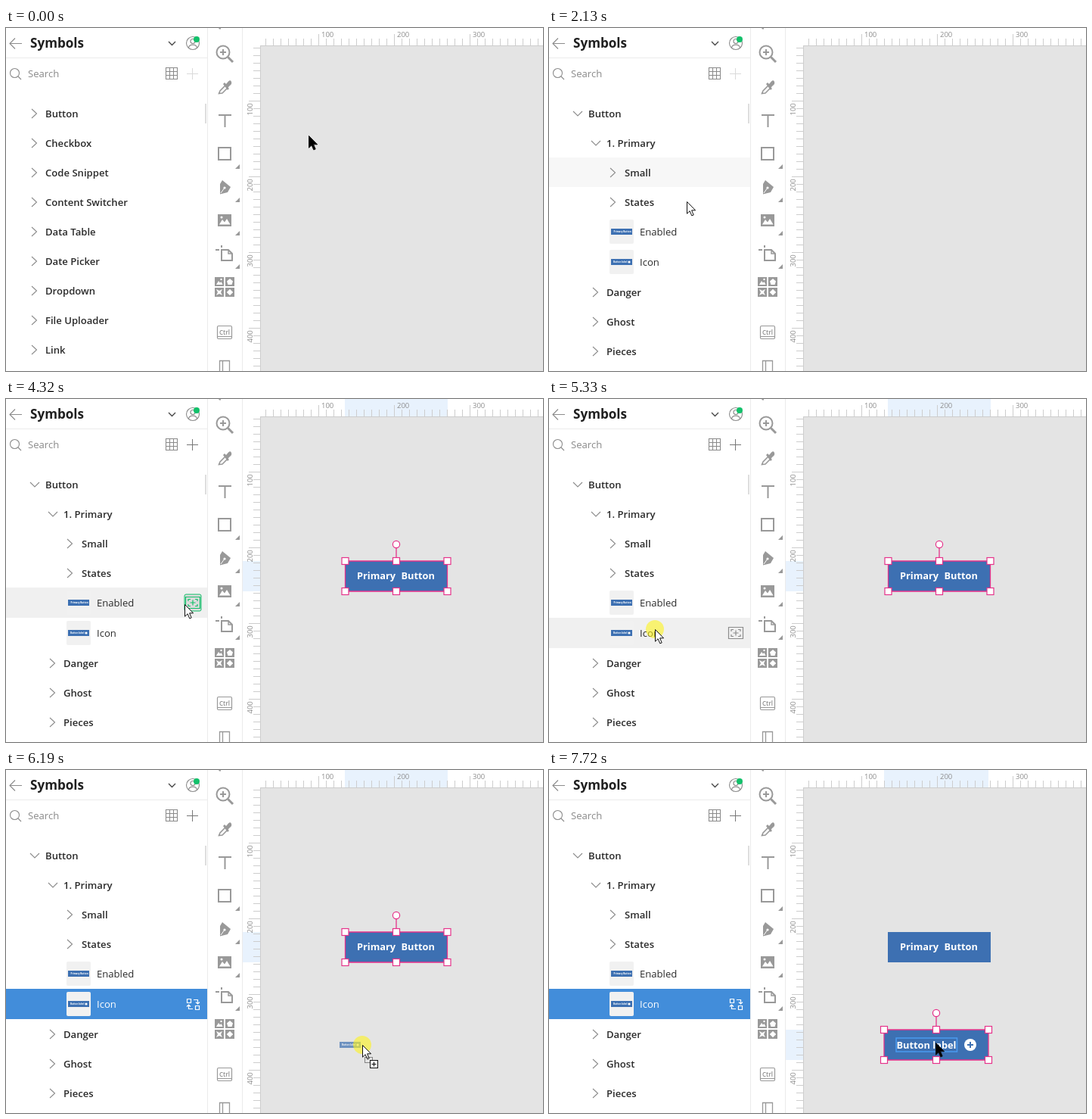
An HTML page for the animation above (8 s loop, 710 by 453 pixels).

```html
<!DOCTYPE html>
<html lang="en">
<head>
<meta charset="utf-8">
<title>Symbols panel</title>
<style>
  html, body { margin: 0; width: 100%; height: 100%; overflow: hidden; background: #fff; }
  svg { display: block; font-family: "Open Sans", "Noto Sans", sans-serif; }
  .line { fill: none; stroke: #8c8c8c; stroke-width: 1.1; }
  .tool { fill: none; stroke: #999; stroke-width: 2; }
  .solid { fill: #999; }
  .row { font-size: 13.1px; font-weight: 600; fill: #2b2b2b; }
  .item { font-size: 13.1px; fill: #2b2b2b; }
  .tick { fill: none; stroke: #cdcdcd; }
  .num { font-size: 9.5px; fill: #8c8c8c; }
  .label { font-size: 12.8px; font-weight: 700; fill: #fff; }
  .tiny { font-size: 3px; font-weight: 700; fill: #fff; }
  .pink { fill: none; stroke: #e5328a; stroke-width: 1.3; }
  .grip { fill: #fff; stroke: #e5328a; stroke-width: 1.2; }
  .blue { fill: #3d70b2; }
</style>
</head>
<body>
<svg id="stage" width="710" height="453" viewBox="0 0 710 453">
  <defs>
    <path id="arrow" d="M.5.5V16.2L4.1 12.7 6.8 18.9 9.2 17.9 6.6 11.8H11.6Z"/>
    <path id="corner" d="M6 0V6H0Z" class="solid"/>
    <g id="thumbA">
      <rect class="blue" width="28" height="8"/>
      <text class="tiny" x="3.5" y="5.2">Primary Button</text>
    </g>
    <g id="thumbB">
      <rect class="blue" width="28" height="8"/>
      <text class="tiny" x="3" y="5.2">Button label</text>
      <circle cx="24" cy="4" r="1.6" fill="#fff"/>
    </g>
  </defs>

  <!-- canvas and rulers -->
  <rect x="336" y="23" width="374" height="430" fill="#e4e4e4"/>
  <rect id="spanX" y="0" height="23" fill="#e8f2fd"/>
  <rect id="spanY" x="313" width="23" fill="#e8f2fd"/>
  <g id="rulers"></g>

  <!-- panel -->
  <rect id="hover" width="266"/>
  <path d="M0 39.5H266M266.5 0V453M312.5 0V453" fill="none" stroke="#ebebeb"/>
  <rect x="263" y="100" width="2" height="26" fill="#dedede"/>
  <path class="line" d="M21 20.5H5M12 13.5L5 20.5 12 27.5"/>
  <text x="32" y="26" font-size="17.1" font-weight="700" fill="#1f1f1f">Symbols</text>
  <path d="M215 18L219.5 22.5 224 18" fill="none" stroke="#444" stroke-width="1.3"/>
  <g class="line">
    <circle cx="247" cy="20" r="8.5"/>
    <circle cx="247" cy="17.5" r="3"/>
    <path d="M241.5 26C242.5 20.8 251.5 20.8 252.5 26"/>
    <circle cx="11.5" cy="59.5" r="6"/>
    <path d="M16 64L20 68M211.5 52.5H226.5V67.5H211.5ZM211.5 57.5H226.5M211.5 62.5H226.5M216.5 52.5V67.5M221.5 52.5V67.5"/>
  </g>
  <circle cx="252" cy="15" r="4" fill="#12c06a"/>
  <text class="item" x="29" y="65" style="fill:#8a8a8a">Search</text>
  <path id="add" d="M239 60.5H254M246.5 53V68" fill="none"/>
  <g id="closed"></g>
  <g id="open"></g>

  <!-- toolbar -->
  <path class="solid" d="M281 0H284V1.500H282Z"/>
  <g class="tool">
    <circle cx="287" cy="32" r="8.5"/>
    <path d="M283 32H291M287 28V36"/>
    <path d="M293.500 38.500L300 45" stroke-width="3"/>
    <path d="M281.500 86.500L283 83 290 76 293 79 286 86Z" stroke-width="1.600"/>
    <path d="M281 115H298M289.500 115V131"/>
    <rect x="281" y="158" width="16" height="16"/>
    <path d="M285 293V307H299V298L294 293ZM277 293H282M285 287V290"/>
    <path d="M294 293V298H299" stroke-width="1.500"/>
    <rect x="279.500" y="393.500" width="19" height="17" rx="1.500" stroke-width="1.200"/>
    <path d="M280 407.500H298" stroke-width="1"/>
    <path d="M282.500 453V439.500H295.500V453M286.500 440V453" stroke-width="1.300"/>
  </g>
  <g class="solid">
    <path d="M287 74L289 72 291 74 294 70.500Q297 68 298 71T296 76L293.500 78.500 295 80 293 82Z"/>
    <path d="M286 201L297 210 293 217 283 219.500V206Z"/>
    <path d="M280 246H298V262H280Z"/>
    <path d="M276 329H288V341H276ZM290 329H302V341H290ZM276 343H288V355H276ZM290 343H302V355H290Z"/>
  </g>
  <g fill="#fff">
    <path d="M282 259.500L286 253 289 256.500 292 252 296.500 259.500Z"/>
    <circle cx="285" cy="250" r="1.500"/>
    <circle cx="289" cy="211" r="1.600"/>
    <path d="M278 339L281 334 283 336.500 284.500 335 286.500 339Z"/>
    <circle cx="284.500" cy="332" r="1.200"/>
    <path d="M296 331L300 334.500 298.500 339H293.500L292 334.500Z"/>
    <path d="M278 345L282 347 286 345 284 349 286 353 282 351 278 353 280 349Z"/>
    <circle cx="296" cy="349" r="3"/>
    <path d="M295.300 345H296.700V353H295.300ZM292 348.300H300V349.700H292Z"/>
  </g>
  <path d="M284 218L289 211" stroke="#fff"/>
  <text x="289" y="405" font-size="8" font-weight="600" text-anchor="middle" fill="#8c8c8c">Ctrl</text>
  <use href="#corner" x="303" y="180"/>
  <use href="#corner" x="303" y="224"/>
  <use href="#corner" x="303" y="268"/>
  <use href="#corner" x="303" y="312"/>

  <!-- paste action and its tip -->
  <g id="paste">
    <rect id="pasteBg" x="236" y="-11" width="22" height="22" rx="2" fill="#dcdcdc"/>
    <path d="M237.500-7.500H256.500V7.500H237.500ZM241-2V-4.500H244M250-4.500H253V-2M253 2V4.500H250M244 4.500H241V2M243.500 0H250.500M247-3.500V3.500" fill="none" stroke-width="1.200"/>
  </g>
  <g id="tip">
    <rect x="254.500" y="299" width="117" height="24.500" rx="2" fill="#000" opacity=".1"/>
    <rect x="255" y="298" width="116" height="24" rx="2" fill="#fafafa"/>
    <text x="262" y="314" font-size="11.300" fill="#777">Paste to workspace</text>
  </g>

  <!-- placed buttons -->
  <g id="first">
    <rect class="blue" x="448" y="214" width="136" height="40"/>
    <text class="label" x="464" y="238" style="word-spacing:4px">Primary Button</text>
  </g>
  <g id="second">
    <rect class="blue" x="443" y="343" width="138" height="40"/>
    <text class="label" x="459.500" y="368">Button label</text>
    <circle cx="557" cy="363" r="8" fill="#fff"/>
    <path d="M553 363H561M557 359V367" stroke="#3d70b2" stroke-width="2"/>
  </g>
  <rect id="textBox" x="459" y="354" width="80.500" height="18" fill="none" stroke="#4a9af0" stroke-width="1.500"/>
  <g id="selA"></g>
  <g id="selB"></g>

  <!-- pointer -->
  <use id="ghost" href="#thumbB" opacity=".7"/>
  <g id="pointer">
    <circle id="glow" r="12" fill="#fdf41c" opacity=".6"/>
    <use id="tipArrow" href="#arrow" stroke="#111"/>
    <g id="copy">
      <rect x="3.500" y="16.500" width="10" height="7" fill="none" stroke="#222" stroke-dasharray="1 1"/>
      <rect x="10.500" y="20.500" width="10" height="10" fill="#fff" stroke="#111"/>
      <path d="M12.500 25.500H18.500M15.500 22.500V28.500" stroke="#111" stroke-width="1.200"/>
    </g>
    <g id="deny" fill="none" stroke="#222" stroke-width="2">
      <circle r="8"/><path d="M-5.600-5.600L5.600 5.600"/>
    </g>
  </g>
</svg>
<script>
const $ = id => document.getElementById(id);
const LOOP = 8000;

// Tree rows
const chevron = (x, y, down) =>
  `<path class="line" d="M${down ? `${x - 6} ${y - 3}l6 6 6-6` : `${x - 4} ${y - 6}l6.500 6-6.500 6`}"/>`;
const branch = (y, level, name, down) =>
  chevron(38 + level * 24 - (level > 1 ? 1 : 0), y, down) +
  `<text class="row" x="${52 + level * 24}" y="${y + 5}">${name}</text>`;
const leaf = (y, name, thumb) =>
  `<rect x="80" y="${y - 16}" width="32" height="32" rx="2" fill="#f1f1f1"/>
   <use href="#${thumb}" x="82" y="${y - 4}"/>
   <text class="item" id="${name}" x="120" y="${y + 5}">${name}</text>`;

$('closed').innerHTML = ['Button', 'Checkbox', 'Code Snippet', 'Content Switcher', 'Data Table',
  'Date Picker', 'Dropdown', 'File Uploader', 'Link']
  .map((name, i) => branch(113 + 39 * i, 0, name)).join('');

$('open').innerHTML =
  branch(113, 0, 'Button', true) + branch(152, 1, '1. Primary', true) +
  branch(191, 2, 'Small') + branch(230, 2, 'States') +
  `<g id="picked"><rect y="289" width="266" height="40" fill="#428dda"/>
   <g fill="none" stroke="#fff" stroke-width="1.200">
     <path d="M239.500 302.500h5v5h-5zM250.500 311.500h5v5h-5zM248 303.500h5.500v5M251 306.500l2.500 2.500 2.500-2.500M247 315.500h-5.500v-5M239 312.500l2.500-2.500 2.500 2.500"/>
   </g></g>` +
  leaf(269, 'Enabled', 'thumbA') + leaf(309, 'Icon', 'thumbB') +
  ['Danger', 'Ghost', 'Pieces'].map((name, i) => branch(349 + 39 * i, 1, name)).join('');

// Rulers
let ticks = '', nums = '';
for (let i = 0; i < 43; i++) {
  const big = i % 10 === 7, x = 343.5 + 10 * i, y = 26.5 + 10 * i;
  const n = (i + 3) * 10;
  if (x < 710) ticks += `M${x} ${big ? 8 : 14}V23`;
  ticks += `M${big ? 321 : 327} ${y}H336`;
  if (!big) continue;
  if (x < 710) nums += `<text class="num" x="${x + 3.5}" y="12">${n}</text>`;
  nums += `<text class="num" transform="translate(325.500 ${y + 19}) rotate(-90)">${n}</text>`;
}
$('rulers').innerHTML = `<path class="tick" d="${ticks}M336.500 23V453M336 23.500H710"/>${nums}`;

// Selection frames
const frame = (l, t, r, b) => {
  const mid = (l + r) / 2;
  const grips = [l, mid, r].flatMap(x => [t, b].map(y =>
    `<rect class="grip" x="${x - 4.5}" y="${y - 4.5}" width="9" height="9"/>`));
  return `<path class="pink" d="M${l} ${t}H${r}V${b}H${l}ZM${mid} ${t}V${t - 17}"/>
    <circle class="grip" cx="${mid}" cy="${t - 22}" r="4.600"/>${grips.join('')}`;
};
$('selA').innerHTML = frame(448.5, 214, 583.5, 254);
$('selB').innerHTML = frame(443, 343, 581, 383);

// Pointer moves: start, end, steps, then [progress, x, y] stops
const moves = [
  [270, 500, 6, [[0, 400, 142], [.5, 262, 128], [1, 181, 124]]],
  [650, 810, 6, [[0, 181, 124], [1, 93, 117]]],
  [1700, 2440, 16, [[0, 93, 117], [9 / 16, 182, 229], [1, 228, 272]]],
  [2540, 2640, 3, [[0, 228, 272], [1, 254, 276]]],
  [2780, 3200, 8, [[0, 254, 276], [1, 246, 270]]],
  [4320, 5010, 15, [[0, 246, 270], [1 / 15, 236, 271], [1, 140, 304]]],
  [5560, 6330, 17, [[0, 140, 304], [5 / 17, 303, 326], [6 / 17, 338, 336],
    [13 / 17, 455, 363], [14 / 17, 471, 363], [1, 494, 363]]],
  [6380, 6480, 3, [[0, 494, 363], [1, 506, 363]]],
  [6660, 6710, 2, [[0, 506, 363], [1, 511, 363]]],
  [7180, 7230, 2, [[0, 511, 363], [1, 512, 363]]],
  [7460, 7540, 2, [[0, 512, 363], [.5, 511, 360], [1, 511, 360]]]
];

function along(stops, u) {
  const i = Math.max(1, stops.findIndex(s => s[0] >= u - 1e-9));
  const [a, b] = [stops[i - 1], stops[i]];
  const k = (u - a[0]) / (b[0] - a[0]);
  return [a[1] + (b[1] - a[1]) * k, a[2] + (b[2] - a[2]) * k];
}

// back = how many steps behind the pointer
function pointerAt(t, back = 0) {
  const m = moves.filter(m => m[0] <= t).pop();
  if (!m) return [400, 142];
  const [start, end, n, stops] = m;
  const step = Math.min(n - 1, Math.floor((t - start) / (end - start) * (n - 1) + .2));
  return along(stops, (step + 1 - back) / n);
}

const edges = [93.5, 132.5, 171, 210, 249, 289, 329];
const within = (t, a, b) => t >= a && t < b;
const show = (id, on) => { $(id).style.display = on ? '' : 'none'; };
const set = (id, attrs) => { for (const k in attrs) $(id).setAttribute(k, attrs[k]); };

function draw(t) {
  const [x, y] = pointerAt(t);
  const [hx, hy] = pointerAt(t - 140);
  const dragging = within(t, 5560, 7460), picked = t >= 5560;
  const placed = t >= 3770, dropped = t >= 7540, reselected = t >= 7720;

  show('closed', t < 1090);
  show('open', t >= 1090);
  show('picked', picked);
  $('Icon').style.fill = picked ? '#fff' : '';

  // Hover follows the pointer with a short delay
  const row = hx < 266 && !picked ? edges.findIndex((e, i) => hy >= e && hy < edges[i + 1]) : -1;
  const item = row > 3;
  show('hover', row >= 0);
  if (row >= 0) set('hover', { y: edges[row], height: edges[row + 1] - edges[row], fill: item ? '#f0f0f0' : '#f7f7f7' });
  const hot = row === 4 && hx >= 235.5 && hy < 275.5;
  show('paste', item);
  show('pasteBg', hot);
  set('paste', { transform: `translate(0 ${row === 5 ? 309 : 269})`, stroke: hot ? '#12c06a' : '#8c8c8c' });
  set('tip', { opacity: within(t, 3480, 3620) ? 1 : within(t, 3430, 3670) ? .55 : 0 });

  show('first', placed);
  show('selA', placed && !reselected);
  show('second', dropped);
  show('selB', reselected);
  show('textBox', reselected);
  show('spanX', placed);
  show('spanY', placed);
  set('spanX', dropped ? { x: 443, width: 138 } : { x: 448, width: 136 });
  set('spanY', dropped ? { y: 343, height: 40 } : { y: 214, height: 40 });
  set('add', { stroke: placed ? '#777' : '#dadada' });

  const denied = dragging && x < 340;
  set('pointer', { transform: `translate(${Math.round(x)} ${Math.round(y)})` });
  show('glow', within(t, 1040, 1190) || within(t, 3620, 3910) || within(t, 5330, 7460));
  show('deny', denied);
  show('tipArrow', !denied);
  show('copy', dragging && !denied);
  set('tipArrow', { fill: x > 267 && !dragging ? '#000' : '#fff' });

  show('ghost', dragging);
  const [gx, gy] = pointerAt(t, 1);
  set('ghost', { x: Math.round(gx) - 14, y: Math.round(gy) - 4 });
}

const began = performance.now();
function tick() {
  draw((performance.now() - began) % LOOP);
  requestAnimationFrame(tick);
}
tick();
</script>
</body>
</html>
```
